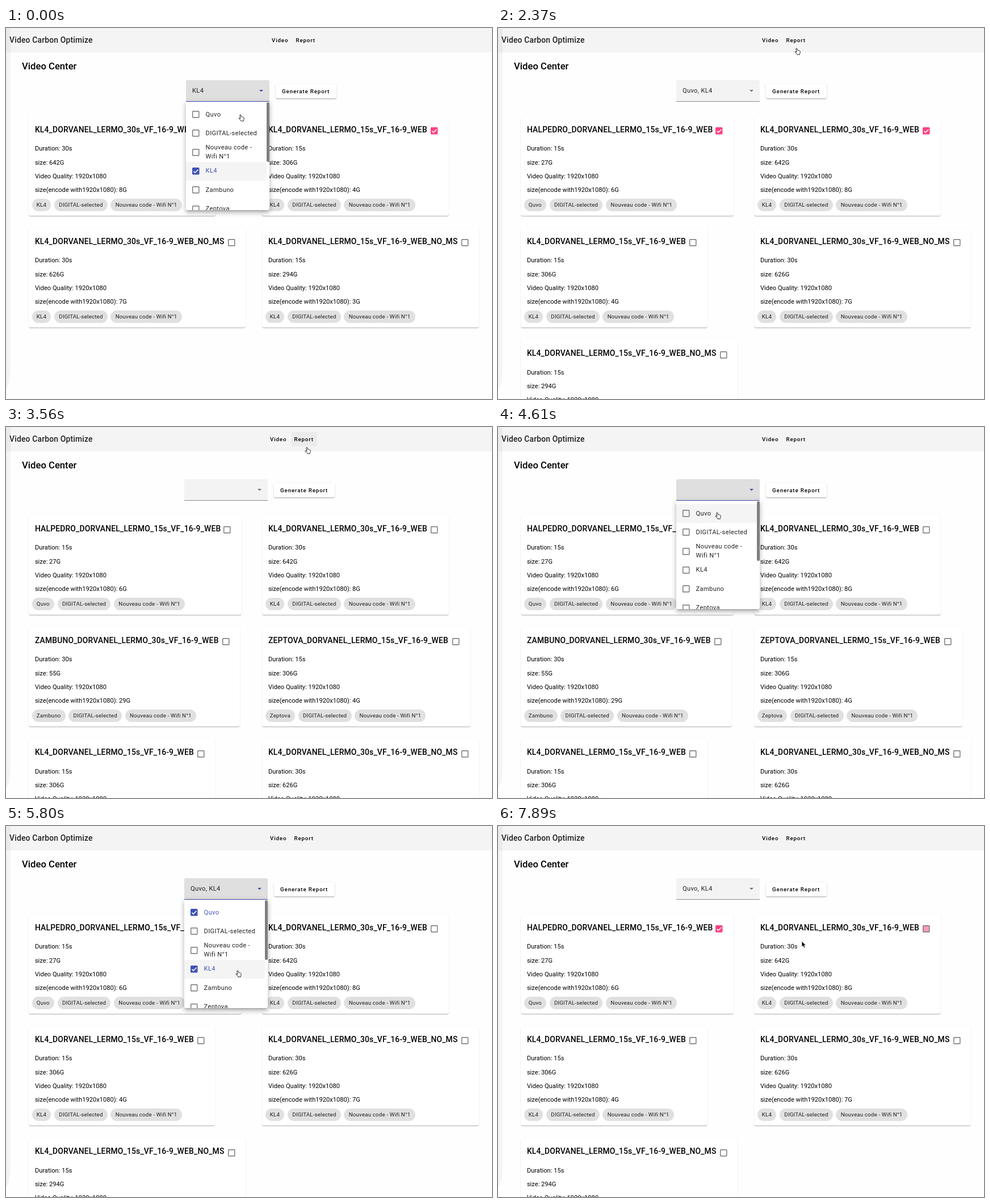
Animation, 856 px wide and 654 px high, one loop 8 s. Source, as an HTML page:

```html
<!DOCTYPE html>
<html lang="en">
<head>
<title>Video Center</title>
<style>
  html, body { margin: 0; width: 100%; height: 100%; overflow: hidden; background: #fefefe; }
  #stage { position: relative; width: 856px; height: 654px; overflow: hidden;
    font: 11.11px Roboto, sans-serif; color: #000; }
  #stage div { position: absolute; box-sizing: border-box; }
  .text { white-space: nowrap; line-height: 16px; }
  .brand, .title { font-size: 13.89px; font-weight: 500; letter-spacing: .0125em; }
  .brand { color: rgba(0,0,0,.87); }
  .heading { font-size: 16.67px; font-weight: 500; }
  .button { font-size: 9.72px; font-weight: 500; letter-spacing: .0893em; }
  .option { letter-spacing: .03125em; color: rgba(0,0,0,.87); }
  .on { color: #3f51b5; }
  .card { background: #fff; border-radius: 3px;
    box-shadow: 0 1.4px .7px -.7px rgba(0,0,0,.2), 0 .7px .7px rgba(0,0,0,.14), 0 .7px 2px rgba(0,0,0,.12); }
  .raised { background: #fff; border-radius: 3px;
    box-shadow: 0 2px .7px -1.4px rgba(0,0,0,.2), 0 1.4px 1.4px rgba(0,0,0,.14), 0 .7px 3.5px rgba(0,0,0,.12); }
  .panel { background: #fff; overflow: hidden; border-radius: 0 0 3px 3px;
    box-shadow: 0 3.5px 3.5px -2px rgba(0,0,0,.2), 0 5.6px 7px .7px rgba(0,0,0,.14), 0 2px 9.7px 1.4px rgba(0,0,0,.12); }
  #stage .chips { display: flex; gap: 5.55px; }
  .chips span { height: 22.2px; padding: 0 8.33px; border-radius: 11.1px; background: #e0e0e0;
    font-size: 9.72px; line-height: 22.2px; letter-spacing: .0179em; white-space: nowrap; color: rgba(0,0,0,.87); }
  #stage svg { position: absolute; overflow: visible; }
</style>
</head>
<body>
<div id="stage"></div>
<script>
const stage = document.getElementById('stage');
const LOOP = 8000, TICKS = 54;
const BLUE = '#3f51b5', PINK = '#ff4081';
const OPTIONS = ['Quvo', 'DIGITAL-selected', 'Nouveau code -<br>Wifi N&deg;1', 'KL4', 'Zambuno', 'Zeptova'];

// Each video: owner, title prefix, seconds, size, encoded size, title suffix, card width
const video = (owner, prefix, seconds, size, encoded, suffix, width) =>
  ({ owner, prefix, seconds, size, encoded, suffix, width });
const quvo = video('Quvo', 'HALPEDRO', 15, 27, 6, '', 374.5);
const zambuno = video('Zambuno', 'ZAMBUNO', 30, 55, 29, '', 372);
const zeptova = video('Zeptova', 'ZEPTOVA', 15, 306, 4, '', 366.5);
const long = video('KL4', 'KL4', 30, 642, 8, '', 328.5);
const short = video('KL4', 'KL4', 15, 306, 4, '', 328.5);
const longPlain = video('KL4', 'KL4', 30, 626, 7, '_NO_MS', 382);
const shortPlain = video('KL4', 'KL4', 15, 294, 3, '_NO_MS', 382);
const channel = [long, short, longPlain, shortPlain];
const mixed = [quvo, ...channel];
const all = [quvo, long, zambuno, zeptova, short, longPlain, shortPlain];

// State changes, each merged over the ones before it
const changes = [
  [0, { cards: channel, selected: ['KL4'], open: 1, panelX: 317, active: ['KL4'], picked: [0, 1], picking: -1, hover: 0 }],
  [2, { cards: mixed, selected: ['Quvo', 'KL4'], active: ['Quvo'] }],
  [13, { open: .5, active: [] }],
  [14, { open: 0 }],
  [18, { hover: 1 }],
  [21, { cards: all, selected: [], picked: [] }],
  [25, { hover: .5 }],
  [26, { hover: 0 }],
  [30, { open: 1, panelX: 314, active: ['Quvo'] }],
  [33, { cards: [quvo], selected: ['Quvo'] }],
  [36, { active: ['Quvo', 'KL4'] }],
  [38, { cards: mixed, selected: ['Quvo', 'KL4'], active: ['KL4'] }],
  [44, { open: .5, active: [] }],
  [45, { open: 0 }],
  [50, { picked: [0] }],
  [53, { picking: 1 }],
];

// Pointer path: tick, x, y, hand shape
const path = [
  [0, 412.5, 152.5, 1], [2, 412.5, 153, 1], [9, 415.5, 160.5, 1], [11, 418, 166, 0], [14, 531, 60, 0],
  [16, 525.5, 35.3, 1], [18, 526, 24, 1], [21, 528, 30, 1], [24, 529.5, 35.5, 1], [26, 520, 50, 0],
  [28, 440, 108, 1], [31, 385, 150, 1], [33, 385, 150, 1], [36, 405.5, 254, 1], [39, 407, 254, 1],
  [41, 480, 215, 0], [43, 664, 93, 0], [44, 667, 88.5, 0], [45, 666, 90, 0], [47, 352, 190, 0],
  [49, 388, 183, 1], [50, 392, 186, 0], [52, 748, 183, 1], [53, 535, 202.5, 0],
];

const box = (x, y, w, h, style = '', inner = '', cls = '') =>
  `<div class="${cls}" style="left:${x}px;top:${y}px;width:${w}px;height:${h}px;${style}">${inner}</div>`;
const text = (x, centerY, cls, content) =>
  `<div class="text ${cls}" style="left:${x}px;top:${centerY - 7.8}px">${content}</div>`;
const svg = (x, y, inner) =>
  `<svg width="14" height="14" style="left:${x}px;top:${y}px">${inner}</svg>`;

function checkbox(centerX, centerY, color, status) {
  const fill = { on: color, half: '#f99dbe', off: 'none' }[status];
  const edge = status === 'on' ? color : '#757575';
  const tick = status === 'on' ? '<path d="M2.4 6.5 5 9.1 10.4 3.7" fill="none" stroke="#fff" stroke-width="1.5"/>' : '';
  return svg(centerX - 6.25, centerY - 6.25,
    `<rect x=".7" y=".7" width="11.1" height="11.1" rx=".8" fill="${fill}" stroke="${edge}" stroke-width="1.4"/>${tick}`);
}

function card(v, index, state) {
  const x = index % 2 ? 451 : 40;
  const y = 157 + Math.floor(index / 2) * 197.2;
  const status = state.picking === index ? 'half' : state.picked.includes(index) ? 'on' : 'off';
  const lines = [`Duration: ${v.seconds}s`, `size: ${v.size}G`, 'Video Quality: 1920x1080',
    `size(encode with1920x1080): ${v.encoded}G`];
  const chips = [v.owner, 'DIGITAL-selected', 'Nouveau code - Wifi N&deg;1'].map(c => `<span>${c}</span>`).join('');
  return box(x, y, v.width, 174, '',
    text(10.9, 21.5, 'title', `${v.prefix}_DORVANEL_LERMO_${v.seconds}s_VF_16-9_WEB${v.suffix}`) +
    checkbox(v.width - 25, 24.5, PINK, status) +
    lines.map((line, i) => text(10.9, 56 + i * 24.3, '', line)).join('') +
    `<div class="chips" style="left:5.5px;top:143.8px">${chips}</div>`, 'card');
}

function panel(state) {
  if (!state.open) return '';
  const rows = OPTIONS.map((name, i) => {
    const on = state.selected.includes(name), y = 5.6 + i * 33.33;
    const top = name.includes('<br>') ? 8.4 : 16.7;
    return (state.active.includes(name) ? box(0, y, 141.5, 33.33, 'background:#f4f4f4') : '') +
      checkbox(17.3, y + 16.7, BLUE, on ? 'on' : 'off') +
      text(34.6, y + top, 'option' + (on ? ' on' : ''), name);
  }).join('');
  const scrollbar = box(142, 1, 5, 105, 'background:#7f7f7f;border-radius:2px');
  return box(state.panelX, 130, 147, 191, `opacity:${state.open}`, rows + scrollbar, 'panel');
}

function select(x, state) {
  const focused = state.open === 1;
  const line = state.open ? `1.5px solid ${BLUE}` : '1px solid #8c8c8c';
  return box(x, 92, 147, 38,
    `background:${focused ? '#dfdfdf' : '#f3f3f3'};border-bottom:${line};border-radius:3px 3px 0 0`,
    text(11, 19, 'option', state.selected.join(', ')) +
    svg(129, 17.3, `<path d="M0 0h7L3.5 3.5Z" fill="${focused ? BLUE : '#757575'}"/>`));
}

function pointer(tick) {
  const i = path.findLastIndex(key => key[0] <= tick);
  const [t0, x0, y0, hand] = path[i];
  const [t1, x1, y1] = path[i + 1] || [t0 + 1, x0, y0];
  const k = (tick - t0) / (t1 - t0);
  const x = x0 + (x1 - x0) * k, y = y0 + (y1 - y0) * k;
  return hand
    ? svg(x - 3.5, y - .5, '<path d="M4 7.6 2.9 2.4Q2.6 .9 3.6 .8 4.5 .6 4.9 2L5.5 4.3Q6.9 3.7 7.2 4.8 8.5 4.3 8.8 5.4 10 5.2 10.2 6.6 10.6 9 9.3 10.4V12H5L4.6 11 1.2 7.6Q.8 6.5 2 6.5Z" fill="#fff" stroke="#111" stroke-width=".9" stroke-linejoin="round"/>')
    : svg(x, y, '<path d="M0 0V10.2L2.3 8.2 4 12 5.9 11.1 4.3 7.5H7.3Z" fill="#000" stroke="#fff" stroke-width=".8"/>');
}

function render(tick) {
  const state = Object.assign({}, ...changes.filter(c => c[0] <= tick).map(c => c[1]));
  // A short list has no page scrollbar, so centred controls sit 3px further right
  const shift = state.cards.length < 5 ? 3 : 0;
  stage.innerHTML =
    box(0, 0, 856, 43, 'background:#f4f4f4') +
    box(0, 0, 8, 636, 'background:rgba(0,0,0,.04);border-radius:0 0 8px 0/0 0 40px 0') +
    text(6, 21, 'brand', 'Video Carbon Optimize') +
    box(503 + shift, 9, 45, 25, `background:rgba(0,0,0,.035);border-radius:3px;opacity:${state.hover}`) +
    text(465 + shift, 21.5, 'button', 'Video') +
    text(507.5 + shift, 21.5, 'button', 'Report') +
    text(28, 67.5, 'heading', 'Video Center') +
    box(472 + shift, 99, 107, 25, '', text(11.1, 12.8, 'button', 'Generate Report'), 'raised') +
    state.cards.map((v, i) => card(v, i, state)).join('') +
    select(314 + shift, state) + panel(state) + pointer(tick);
}

let shown = -1;
function frame(now) {
  const tick = Math.floor((now % LOOP + 12) / (LOOP / TICKS)) % TICKS;
  if (tick !== shown) render(shown = tick);
  requestAnimationFrame(frame);
}
render(0);
requestAnimationFrame(frame);
</script>
</body>
</html>
```
